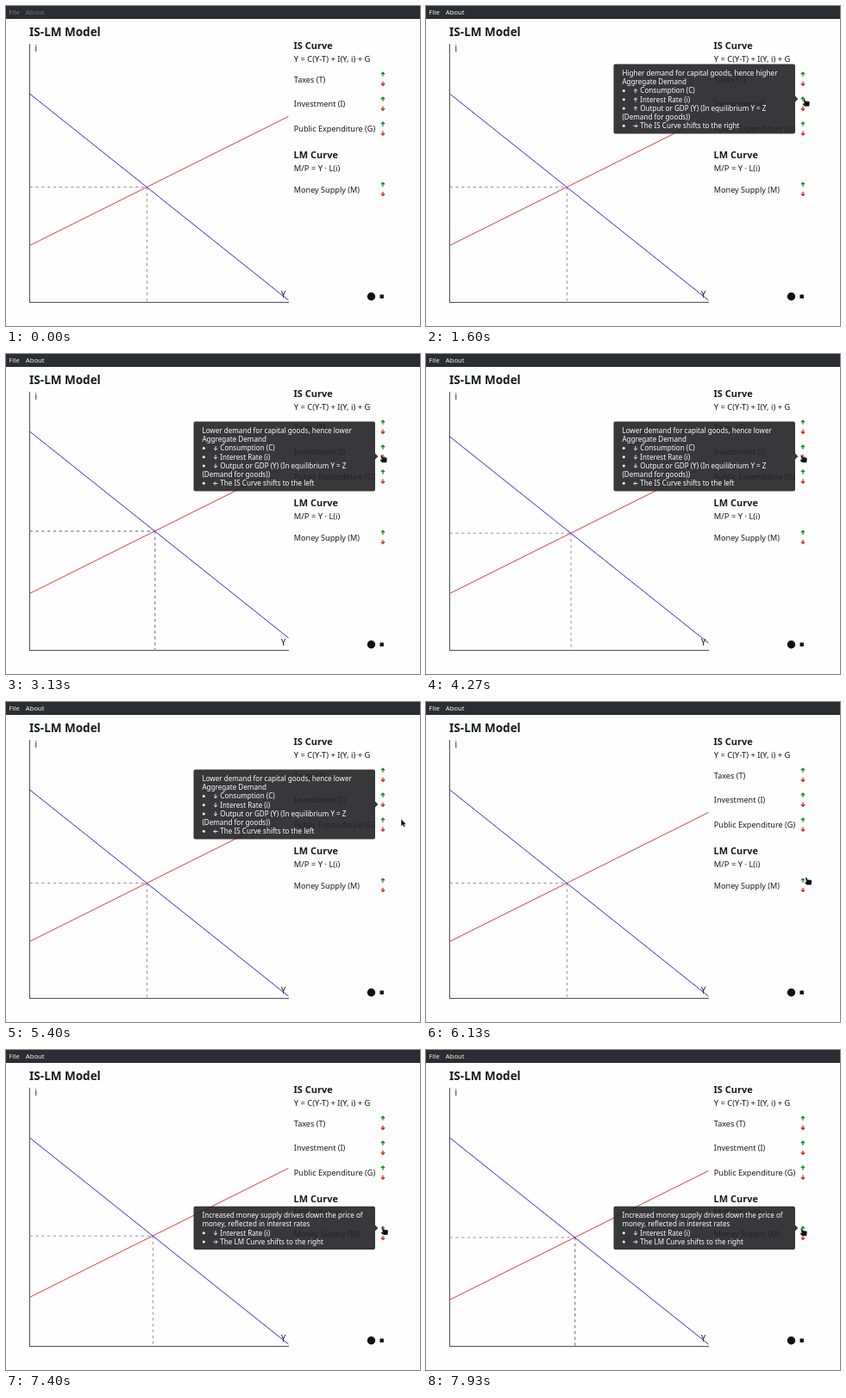
Recreate the animation shown at these times as an HTML page. Size 480 by 372 pixels, loop 8000 ms.

```html
<!DOCTYPE html>
<html lang="en">
<head>
<meta charset="utf-8">
<title>IS-LM Model</title>
<style>
  html, body { margin: 0; width: 100%; height: 100%; overflow: hidden; background: #fefefe; }
  svg { display: block; width: 480px; height: 372px; font-family: "Noto Sans", sans-serif; }
  text { fill: #17191b; white-space: pre; }
  .title { font-size: 13.5px; font-weight: 700; }
  .head { font-size: 11px; font-weight: 700; }
  .formula { font-size: 9.4px; }
  .label { font-size: 9.1px; }
  .axis { font-size: 10px; }
  .menu text { font-size: 7.7px; fill: inherit; }
  .tip text { font-size: 8.1px; fill: #fcfcfc; }
  .arrow { fill: none; stroke-linecap: square; }
</style>
</head>
<body>
<svg id="stage" viewBox="0 0 480 372"></svg>
<script>
const LOOP = 8000, STEP = 3;
const LEFT = 27.5, RIGHT = 327.5, BASE = 344.5;
const RAISE_IS = [1670, 1940, 2210, 2470];
const LOWER_IS = [3800, 4110, 4400, 4670];
const RAISE_LM = [6730, 7010, 7330, 7600];
// time, x, y of the pointer's hot spot
const PATH = [
  [870, 482, 138], [960, 464, 124], [1070, 445, 111], [1200, 437.5, 108],
  [2540, 437.5, 108], [2870, 434.5, 117.5],
  [4730, 434.5, 117.5], [5130, 449, 127], [5400, 458, 136],
  [5600, 467, 147], [5800, 462, 174], [6130, 440, 204],
  [6330, 437, 205.5], [7270, 436.5, 205.5], [7600, 434.5, 207.5], [8000, 434.5, 207.5]
];
const TIPS = [
  { from: 1200, to: 2800, top: 67.5, point: 108, lines: [
    "Higher demand for capital goods, hence higher", "Aggregate Demand",
    "↑ Consumption (C)", "↑ Interest Rate (i)",
    "↑ Output or GDP (Y) (In equilibrium Y = Z", "(Demand for goods))",
    "→ The IS Curve shifts to the right"] },
  { from: 2800, to: 5470, top: 78.5, point: 119, lines: [
    "Lower demand for capital goods, hence lower", "Aggregate Demand",
    "↓ Consumption (C)", "↓ Interest Rate (i)",
    "↓ Output or GDP (Y) (In equilibrium Y = Z", "(Demand for goods))",
    "← The IS Curve shifts to the left"] },
  { from: 6400, to: 8000, top: 181.7, point: 207, lines: [
    "Increased money supply drives down the price of", "money, reflected in interest rates",
    "↓ Interest Rate (i)", "→ The LM Curve shifts to the right"] }
];
const TIP_LINE = 10.2;
const TURN = { "↑": 0, "→": 90, "↓": 180, "←": 270 };
const stage = document.getElementById("stage");

function add(tag, attrs, parent = stage) {
  const node = document.createElementNS("http://www.w3.org/2000/svg", tag);
  set(node, attrs);
  parent.append(node);
  return node;
}
function set(node, attrs) {
  for (const key in attrs) node.setAttribute(key, attrs[key]);
}
function write(x, y, text, kind, parent) {
  add("text", { x, y, class: kind }, parent).textContent = text;
}
function line(x1, y1, x2, y2, stroke, extra) {
  return add("line", { x1, y1, x2, y2, stroke, ...extra });
}
function arrow(x, y, sign, size, stroke, width, parent) {
  add("path", {
    class: "arrow", stroke, "stroke-width": width / size,
    d: "M0 1V-.85M-.8 -.1L0 -.9L.8 -.1",
    transform: `translate(${x} ${y}) rotate(${TURN[sign]}) scale(${size})`
  }, parent);
}

// window and diagram
add("rect", { width: 480, height: 15, fill: "#2a2e32" });
const menu = add("g", { class: "menu" });
write(3.6, 10.2, "File", "", menu);
write(22.8, 10.2, "About", "", menu);
write(27.1, 35.3, "IS-LM Model", "title");

const axis = "#505050";
line(LEFT, 44, LEFT, 345, axis);
line(27, BASE, 328, BASE, axis);
write(33.4, 53.4, "i", "axis");
write(318.8, 338.6, "Y", "axis");
const dash = { "stroke-dasharray": "3.4 3.4" };
const across = line(LEFT, 0, 0, 0, "#999", dash);
const down = line(0, 0, 0, BASE, "#999", dash);
const lm = line(LEFT, 0, RIGHT, 0, "#e23c3c");
const is = line(LEFT, 0, RIGHT, 0, "#2c2cdc");

// side panel
write(333.6, 50.2, "IS Curve", "head");
write(333.8, 65.4, "Y = C(Y-T) + I(Y, i) + G", "formula");
write(333.6, 177.3, "LM Curve", "head");
write(333.8, 192.4, "M/P = Y · L(i)", "formula");
[["Taxes (T)", 88.5], ["Investment (I)", 117.4],
 ["Public Expenditure (G)", 146.3], ["Money Supply (M)", 216.6]].forEach(([name, y]) => {
  write(333.8, y, name, "label");
  arrow(437, y - 9.4, "↑", 2.1, "#16851f", 1.25);
  arrow(437, y + 2, "↓", 2.1, "#e01b1b", 1.25);
});
add("circle", { cx: 423.5, cy: 337.7, r: 4.7, fill: "#111" });
add("rect", { x: 433.5, y: 335.5, width: 4.4, height: 4.4, fill: "#111" });

const tips = TIPS.map(({ top, point, lines }) => {
  const tip = add("g", { class: "tip" });
  const bottom = top + lines.length * TIP_LINE + 9.6;
  add("path", {
    d: `M219.5 ${top}H426q2 0 2 2V${point - 3.5}l3.4 3.5l-3.4 3.5V${bottom - 2}q0 2 -2 2H219.5q-2 0 -2 -2V${top + 2}q0 -2 2 -2z`,
    fill: "#232326", "fill-opacity": .9
  }, tip);
  lines.forEach((text, i) => {
    const y = top + 13.4 + i * TIP_LINE;
    const sign = text[0];
    if (!(sign in TURN)) return write(227.4, y, text, "", tip);
    add("circle", { cx: 229.3, cy: y - 2.8, r: 1.5, fill: "#fcfcfc" }, tip);
    arrow(243, y - 2.6, sign, 2.2, "#fcfcfc", .85, tip);
    write(248.3, y, text.slice(2), "", tip);
  });
  return tip;
});

// pointers
const look = { fill: "#111", stroke: "#fff", "stroke-width": .35, "stroke-linejoin": "round" };
const hand = add("path", { ...look,
  d: "M-.2 .2Q.7 -.6 1.6 .2L2.5 2.4L6 2.8Q7.5 3.1 7.4 4.5L6.9 8.8H1.5L-.8 6.2Q-1 5.1 .5 5.1L1 5.2z" });
const pointer = add("path", { ...look, d: "M0 0V8.4L1.9 6.7L3.2 9.4L4.7 8.7L3.4 6.1H5.9z" });

const clicks = (times, t) => times.filter(at => at <= t).length;

function pointerAt(t) {
  const next = PATH.findIndex(p => p[0] > t);
  if (next < 1) return null;
  const [t0, x0, y0] = PATH[next - 1], [t1, x1, y1] = PATH[next];
  const k = (t - t0) / (t1 - t0);
  return [x0 + (x1 - x0) * k, y0 + (y1 - y0) * k];
}

function draw(t) {
  const isTop = 102 - STEP * (clicks(RAISE_IS, t) - clicks(LOWER_IS, t));
  const lmTop = 278.4 + STEP * clicks(RAISE_LM, t);
  set(is, { y1: isTop, y2: isTop + 240 });
  set(lm, { y1: lmTop, y2: lmTop - 150 });

  // the curves have slopes .8 and -.5
  const run = (lmTop - isTop) / 1.3;
  const x = LEFT + run + .3, y = isTop + run * .8;
  set(across, { x2: x, y1: y, y2: y, "stroke-width": y < 207 ? 1.5 : 1 });
  set(down, { x1: x, x2: x, y1: y, "stroke-width": x > 171 ? 1.5 : 1 });

  set(menu, { fill: t < 1600 ? "#75787b" : "#f4f4f4" });
  tips.forEach((tip, i) => {
    const shown = t >= TIPS[i].from && t < TIPS[i].to;
    set(tip, { visibility: shown ? "visible" : "hidden" });
  });

  const spot = pointerAt(t);
  const overButton = spot && spot[0] < 442;
  set(hand, { visibility: overButton ? "visible" : "hidden" });
  set(pointer, { visibility: spot && !overButton ? "visible" : "hidden" });
  if (spot) set(overButton ? hand : pointer, { transform: `translate(${spot})` });
}

const start = performance.now();
function tick() {
  draw((performance.now() - start) % LOOP);
  requestAnimationFrame(tick);
}
tick();
</script>
</body>
</html>
```
